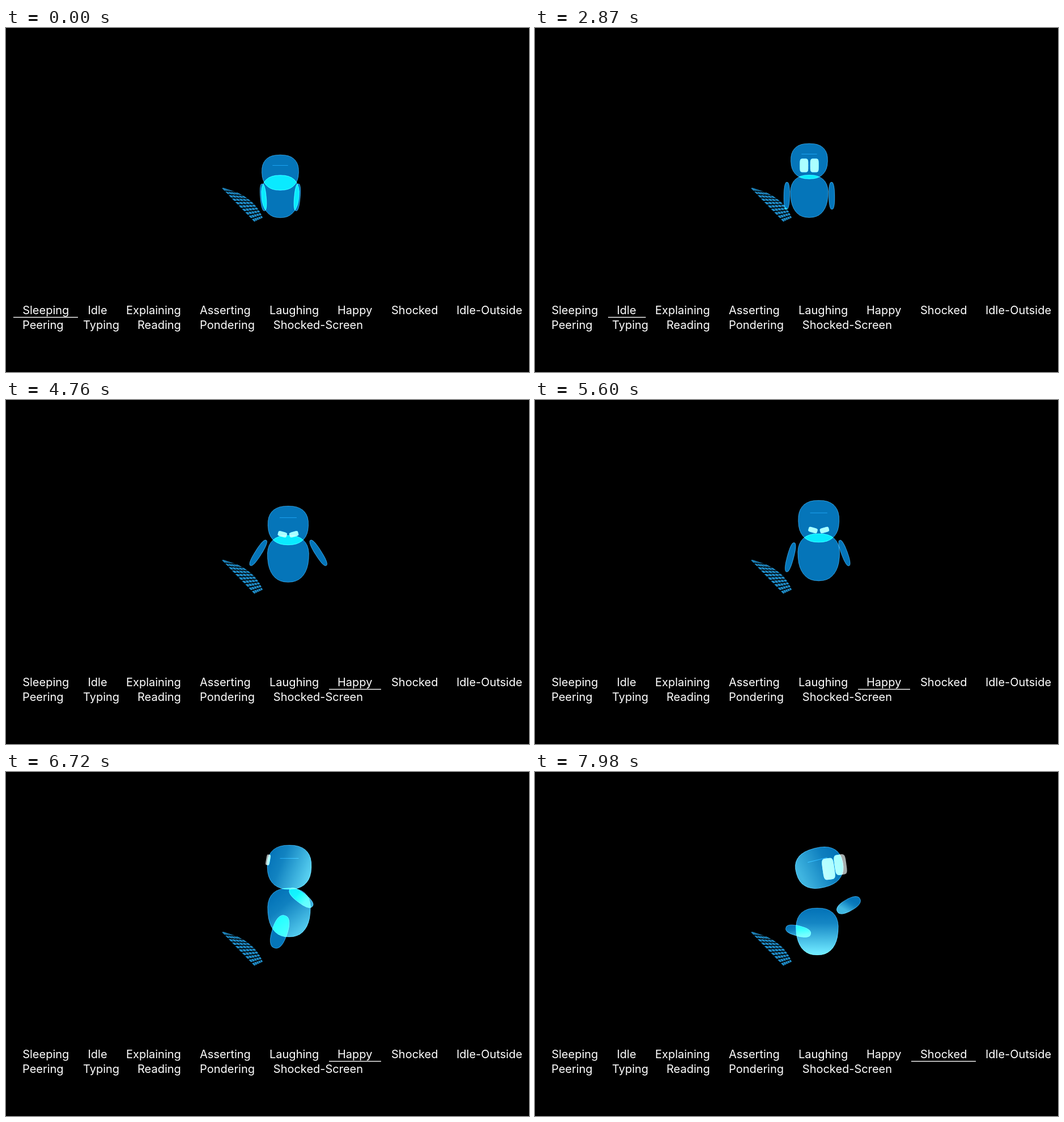
These frames come from a looping animation (923x607 px, 8 s). An HTML page with a canvas:

```html
<!DOCTYPE html>
<html lang="en">
<head>
<meta charset="utf-8">
<title>Robot moods</title>
<style>
  html, body { margin: 0; width: 100%; height: 100%; overflow: hidden; background: #000; }
  canvas, svg { position: absolute; left: 0; top: 0; width: 923px; height: 607px; }
  text { font: 20px Inter, sans-serif; fill: #fff; }
</style>
</head>
<body>
<canvas id="stage" width="923" height="607"></canvas>
<svg id="menu" viewBox="0 0 923 607"></svg>
<script>
const LOOP = 8000, STEP = 70;
const ctx = document.getElementById('stage').getContext('2d');

// Menu labels: text, x, baseline
const labels = [
  ['Sleeping', 29.2, 505], ['Idle', 144.5, 505], ['Explaining', 212, 505],
  ['Asserting', 342, 505], ['Laughing', 465, 505], ['Happy', 585, 505],
  ['Shocked', 680, 505], ['Idle-Outside', 795, 505],
  ['Peering', 29, 531], ['Typing', 136, 531], ['Reading', 232, 531],
  ['Pondering', 342, 531], ['Shocked-Screen', 471.8, 531]
];
const menu = document.getElementById('menu');
for (const [word, x, y] of labels) {
  const el = document.createElementNS(menu.namespaceURI, 'text');
  el.setAttribute('x', x);
  el.setAttribute('y', y);
  el.textContent = word;
  menu.append(el);
}

// Active item: start time, x, width
const active = [[0, 13, 114], [1050, 129, 66.5], [3010, 570, 92], [7210, 664, 114]];

// Parts are [x, y, width, height, degrees, glowX, glowY].
// arm: [offset x, offset y, degrees]; eye: [width, height, offset y, tilt]
function front({ x = 484, hy, by, s = 1, hh = 62.5 * s, arm, eye }, extra) {
  const [dx, dy, turn] = arm, [w, h, ey, tilt] = eye;
  const side = k => [x + k * dx, by + dy, 10.5 * s, 48 * s, -k * turn, 0, 0];
  const look = k => [x + k * 9.2 * s, hy + ey, w, h, -k * tilt, 0, 0];
  return {
    head: [x, hy, 65 * s, hh, 0, 0, 0],
    body: [x, by, 66 * s, 75 * s, 0, 0, 0],
    armL: side(-1), armR: side(1), eyeL: look(-1), eyeR: look(1),
    ...extra
  };
}

const shut = [10, 0, 9, 0], open = [15, 24, 7.5, 0], grin = [16, 9, 15.5, 16];
const sleep = y => front({ hy: 255 + y / 2, by: 297.3 + y, arm: [30, 1.5, -5], eye: shut });
const idle = (hy, dx) => front({ hy, by: 297, arm: [dx, -1, 1], eye: open });
const crouch = (x, hy, by) => front({ x, hy, by, s: 1.1, arm: [55, -13, 40], eye: grin });

const flip = {
  head: [486, 138.5, 77, 84, 0, 0.05, 1],
  body: [512, 207, 86, 107, -14, 0, 0.15],
  armL: [487, 231, 17, 70, -27, 0, 0], armR: [549, 215.5, 16, 70, 3, 0, 0],
  eyeL: [468, 97, 17, 6, -5, 0, 0], eyeR: [488, 94, 15, 6, -15, 0, 0]
};
const turn = {
  head: [500, 168, 78, 78, 0, 0.75, 0.3],
  body: [499.5, 248, 75, 86, 0, 0.45, 0.55],
  armL: [483, 282, 27, 60, 18, 0, 0], armR: [521, 222, 18, 50, -53, 0.4, 0.3],
  eyeL: [462.5, 155, 7, 19, 10, 0, 0], eyeR: [466, 155, 0, 19, 10, 0, 0]
};
const shock = {
  head: [502, 169, 84, 71, -14, -0.5, 0.25],
  body: [498, 281.5, 74, 83, 0, 0, 1],
  armL: [464.5, 280.5, 18, 45, 104, 0.1, 0.5], armR: [553.5, 235, 21, 46, -120, -0.3, 0.5],
  eyeL: [518, 171, 21, 38, -8, 0, 0], eyeR: [539, 163.5, 21, 36, -8, 0, 0]
};
const lift = (pose, y) =>
  Object.fromEntries(Object.entries(pose).map(([k, p]) => [k, p.map((v, i) => i === 1 ? v - y : v)]));

const keys = [
  [0, sleep(0)],
  [450, sleep(1)],
  [1010, sleep(0)],
  [1400, front({ hy: 241.5, by: 297, arm: [37.3, 0, 1], eye: [11, 17, 9, 0] })],
  [1680, idle(231.5, 40)],
  [2120, idle(224.7, 42)],
  [2870, idle(235, 39.7)],
  [3150, idle(236, 40)],
  [3480, crouch(495, 262, 310)],
  [3990, flip],
  [4200, front({ x: 503, hy: 192, by: 256, s: 1.12, arm: [50, -8, 20], eye: grin })],
  [4480, crouch(497, 274, 320)],
  [4950, front({ x: 499, hy: 192, by: 258, s: 1.1, arm: [52, -9, 28], eye: grin })],
  [5250, crouch(501, 258, 309)],
  [5600, front({ x: 500.7, hy: 214, by: 277.5, s: 1.11, hh: 74, arm: [50, 0, 15], eye: grin },
    { armR: [546, 270, 11, 48, -20, 0, 0] })],
  [5740, front({ x: 500.5, hy: 199, by: 264, s: 1.11, hh: 74, arm: [49, -3, 18], eye: grin })],
  [6120, crouch(500, 236, 290)],
  [6560, lift(turn, 9)],
  [6720, turn],
  [6980, front({ x: 500, hy: 209, by: 278, s: 1.11, hh: 74, arm: [52, -6, 25], eye: grin })],
  [7220, front({ x: 500, hy: 212, by: 280, s: 1.11, hh: 74, arm: [50, -4, 20], eye: grin })],
  [7560, front({ x: 499, hy: 174, by: 281, s: 1.11, hh: 74, arm: [51, -24, 100], eye: [20, 36, 2, 4] })],
  [7980, shock]
];

// Smooth key-to-key curve that never overshoots a key
function slope(i, part, j) {
  if (i === 0 || i === keys.length - 1) return 0;
  const [a, b, c] = [keys[i - 1], keys[i], keys[i + 1]];
  const d0 = (b[1][part][j] - a[1][part][j]) / (b[0] - a[0]);
  const d1 = (c[1][part][j] - b[1][part][j]) / (c[0] - b[0]);
  return d0 * d1 <= 0 ? 0 : 2 * d0 * d1 / (d0 + d1);
}

function poseAt(t) {
  const last = keys.length - 1;
  if (t >= keys[last][0]) return keys[last][1];
  const i = keys.findIndex(k => k[0] > t) - 1;
  const [t0, a] = keys[i], [t1, b] = keys[i + 1];
  const d = t1 - t0, u = (t - t0) / d, v = 1 - u, pose = {};
  for (const part in a) {
    pose[part] = a[part].map((p, j) =>
      p * v * v * (1 + 2 * u) + b[part][j] * u * u * (3 - 2 * u) +
      d * u * v * (slope(i, part, j) * v - slope(i + 1, part, j) * u));
  }
  return pose;
}

// Superellipse that narrows towards its lower end
function blob(w, h, power, taper) {
  const n = 36, bend = v => Math.sign(v) * Math.abs(v) ** (2 / power);
  ctx.beginPath();
  for (let i = 0; i < n; i++) {
    const a = i / n * 2 * Math.PI, y = bend(Math.sin(a));
    ctx.lineTo(bend(Math.cos(a)) * w / 2 * (1 - taper * y), y * h / 2);
  }
  ctx.closePath();
}

function place([x, y, , , deg], draw) {
  ctx.save();
  ctx.translate(x, y);
  ctx.rotate(deg * Math.PI / 180);
  draw();
  ctx.restore();
}

const BASE = [5, 117, 185], BRIGHT = [110, 232, 255];
const tone = k => `rgb(${BASE.map((c, i) => Math.round(c + (BRIGHT[i] - c) * k))})`;

function drawPart(part, power, taper) {
  const [, , w, h, deg, gx, gy] = part;
  place(part, () => {
    const glow = Math.hypot(gx, gy), r = Math.min(w, h) / 2;
    const a = Math.atan2(gy, gx) - deg * Math.PI / 180;
    const x = Math.cos(a) * r, y = Math.sin(a) * r;
    const fill = ctx.createLinearGradient(-x, -y, x, y);
    fill.addColorStop(0, tone(0));
    fill.addColorStop(0.3, tone(glow * 0.15));
    fill.addColorStop(1, tone(Math.min(1, glow)));
    blob(w, h, power, taper);
    ctx.fillStyle = fill;
    ctx.fill();
    ctx.strokeStyle = 'rgba(90, 150, 180, 0.5)';
    ctx.lineWidth = 1;
    ctx.stroke();
  });
}

function drawVisor(head) {
  const [, , w, h] = head;
  place(head, () => {
    ctx.strokeStyle = 'rgba(90, 190, 230, 0.3)';
    ctx.lineWidth = 0.8;
    ctx.beginPath();
    ctx.moveTo(-w * 0.21, -h * 0.2);
    ctx.lineTo(w * 0.21, -h * 0.2);
    ctx.stroke();
  });
}

function drawEye(eye) {
  const [, , w, h] = eye;
  if (w < 0.6 || h < 0.6) return;
  place(eye, () => {
    blob(w, h, 4.5, 0);
    ctx.fillStyle = 'rgb(166, 174, 174)';
    ctx.fill();
  });
}

// Keyboard seen at a steep angle, spanned between two edges
function drawKeyboard() {
  const rows = 10, cols = 5;
  const at = (u, k) => {
    const v = u ** 0.6, q = 1 - v;
    const lx = 381 + 59 * u, ly = 282.5 + 61 * u;
    const rx = 384 * q * q + 880 * q * v + 454 * v * v;
    const ry = 282 + 28 * v + 26 * v * v;
    return [lx + (rx - lx) * k, ly + (ry - ly) * k];
  };
  ctx.fillStyle = 'rgb(31, 143, 204)';
  for (let r = 0; r < rows; r++) {
    for (let c = 0; c < cols; c++) {
      const u0 = r / rows, u1 = (r + 0.7) / rows;
      const k0 = c / cols, k1 = (c + 0.84) / cols;
      ctx.beginPath();
      for (const [u, k] of [[u0, k0], [u0, k1], [u1, k1], [u1, k0]]) ctx.lineTo(...at(u, k));
      ctx.fill();
    }
  }
}

function draw(t) {
  ctx.globalCompositeOperation = 'source-over';
  ctx.fillStyle = '#000';
  ctx.fillRect(0, 0, 923, 607);
  const [, x, w] = active.filter(item => item[0] <= t).pop();
  ctx.fillStyle = '#fff';
  ctx.fillRect(x, 509.8, w, 1.4);

  ctx.globalCompositeOperation = 'lighter';
  drawKeyboard();
  const pose = poseAt(t);
  drawPart(pose.body, 2.4, 0.09);
  drawPart(pose.armL, 2.4, 0);
  drawPart(pose.armR, 2.4, 0);
  drawPart(pose.head, 2.4, 0.03);
  drawVisor(pose.head);
  drawEye(pose.eyeL);
  drawEye(pose.eyeR);
}

function tick() {
  const t = performance.now() % LOOP;
  draw(Math.floor(t / STEP) * STEP);
  requestAnimationFrame(tick);
}
tick();
</script>
</body>
</html>
```
